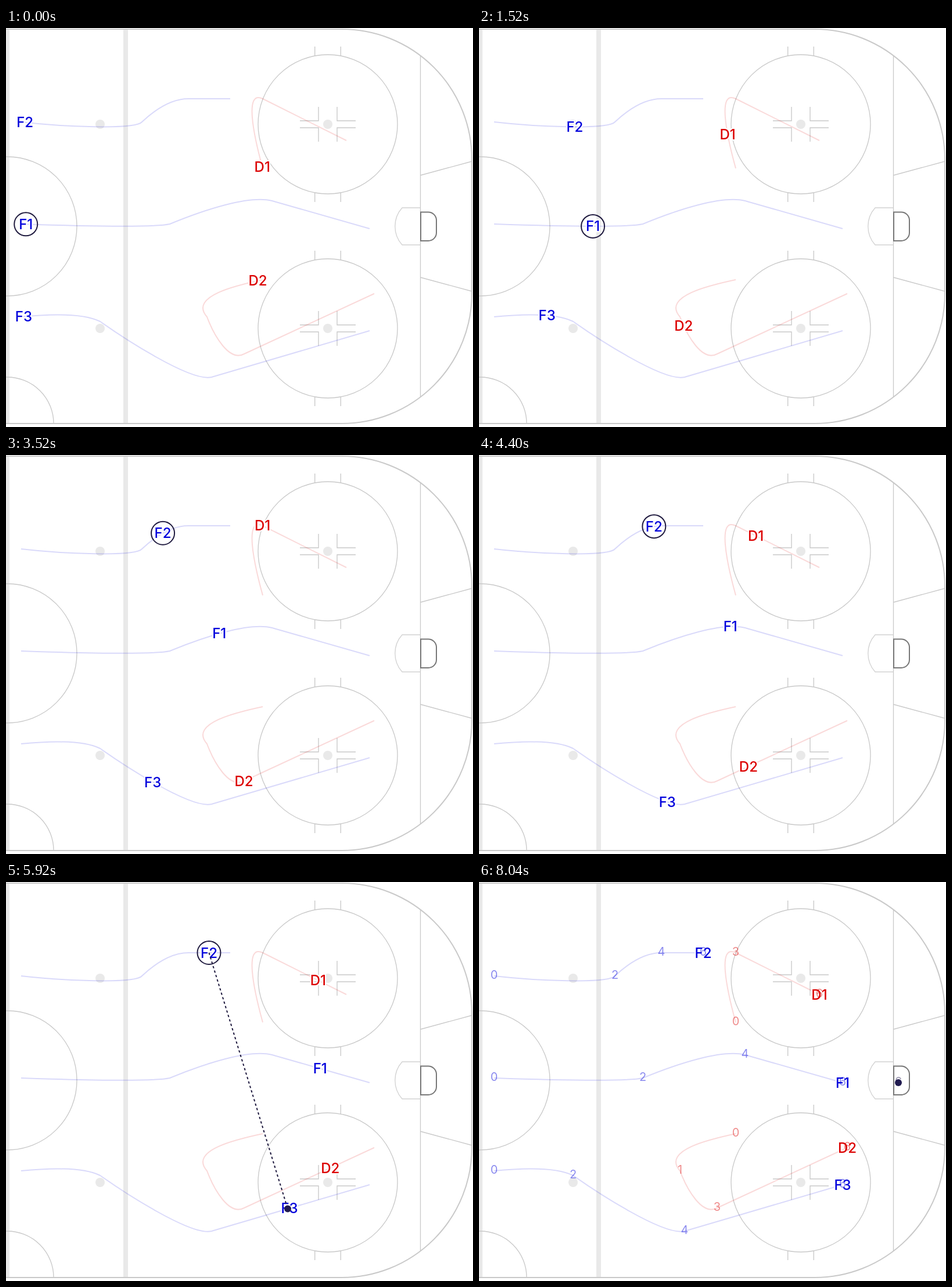
An HTML page that plays this animation: 804 px wide and 688 px high, repeating every 8080 ms.

```html
<!DOCTYPE html>
<html lang="en">
<head>
<meta charset="utf-8">
<title>Rush drill</title>
<style>
  html, body { margin: 0; width: 100%; height: 100%; overflow: hidden; background: #fff; }
  svg { display: block; width: 804px; height: 688px; font-family: Inter, Roboto, "Liberation Sans", sans-serif; }
  .line { fill: none; stroke: #c9c9c9; stroke-width: 1.35; }
  .fill { fill: #e9e9e9; }
  .route { fill: none; stroke-width: 2; opacity: .15; }
  .label { font-size: 24px; font-weight: 500; text-anchor: middle; stroke: #fff; stroke-width: 4; paint-order: stroke; }
  .count { font-size: 20px; text-anchor: middle; }
</style>
</head>
<body>
<svg id="stage" viewBox="0 0 804 688">
  <rect class="fill" x="-2" y="2" width="8" height="680"/>
  <rect class="fill" x="202" y="2" width="8" height="680"/>
  <circle class="fill" cx="162" cy="166" r="8"/>
  <circle class="fill" cx="162" cy="518" r="8"/>
  <g class="line">
    <circle cx="2" cy="342" r="120"/>
    <circle cx="2" cy="682" r="80"/>
    <path d="M713.5 47.5V636.5M713.5 254L802 230M713.5 430L802 454"/>
    <path d="M713.5 310H682A48 48 0 0 0 682 374H713.5" stroke="#d2d2d2"/>
  </g>
  <g id="spots"></g>
  <path class="line" style="stroke-width:2" d="M-4 2H578A224 224 0 0 1 802 226V458A224 224 0 0 1 578 682H-4"/>
  <rect x="-2" y="683" width="700" height="5" fill="#fff"/>
  <path d="M714 317.5H727A14 14 0 0 1 741 331.5V353A14 14 0 0 1 727 367H714Z" fill="none" stroke="#777" stroke-width="2"/>
  <g id="routes"></g>
  <g id="labels"></g>
  <circle id="ring" r="20" fill="none" stroke="#1f1a3f" stroke-width="2"/>
  <line id="pass" stroke="#1f1a3f" stroke-width="2" stroke-dasharray="4 4"/>
  <circle id="puck" r="6" fill="#211b50"/>
  <g id="counts"></g>
</svg>
<script>
const LOOP = 8080, UNIT = 1200;
const BLUE = '#0000dc', RED = '#dc0000', NAVY = '#211b50';
const GOAL = [722, 346];

// Each leg: the count it ends on, end point, optional two curve handles.
const players = {
  F1: { color: BLUE, start: [26, 338], legs: [
    [2, 282, 338, '112 341 250 345'], [4, 458, 298, '340 314 418 288'], [6, 626, 346]] },
  F2: { color: BLUE, start: [26, 162], legs: [
    [2, 234, 162, '95 170 222 176'], [4, 314, 122, '250 147 280 122'], [6, 386, 122]] },
  F3: { color: BLUE, start: [26, 498], legs: [
    [2, 162, 506, '66 494 130 490'], [4, 354, 602, '200 533 318 611'], [6, 626, 522]] },
  D1: { color: RED, start: [442, 242], legs: [
    [3, 442, 122, '426 184 410 106'], [6, 586, 194]] },
  D2: { color: RED, start: [442, 434], legs: [
    [1, 346, 498, '400 443 314 462'], [3, 410, 562, '358 530 384 576'], [6, 634, 458]] }
};

// Puck leaves at `from`, lands at `land`, changes hands at `end`.
const passes = [
  { by: 'F1', to: 'F2', from: 2400, land: 2670, end: 2700 },
  { by: 'F2', to: 'F3', from: 5700, land: 5956, end: 6000 },
  { by: 'F3', to: null, from: 7200, land: 7490, end: 7490 }
];

const $ = id => document.getElementById(id);

function make(tag, attrs, parent, text) {
  const el = document.createElementNS('http://www.w3.org/2000/svg', tag);
  set(el, attrs);
  if (text !== undefined) el.textContent = text;
  if (parent) parent.appendChild(el);
  return el;
}

function set(el, attrs) {
  for (const key in attrs) el.setAttribute(key, attrs[key]);
}

function addCount(n, x, y, color) {
  make('text', { class: 'count', x, y: y + 5, fill: color }, $('counts'), n);
}

for (const cy of [166, 518]) {
  const g = make('g', { transform: `translate(554 ${cy})` }, $('spots'));
  make('circle', { class: 'line', r: 120 }, g);
  make('circle', { class: 'fill', r: 8 }, g);
  for (const sx of [-1, 1]) for (const sy of [-1, 1]) {
    make('path', { class: 'line', d:
      `M${48 * sx} ${6 * sy}H${16 * sx}V${30 * sy}M${22.3 * sx} ${118 * sy}V${134 * sy}` }, g);
  }
}

for (const name in players) {
  const p = players[name];
  let [x, y] = p.start, last = 0, route = `M${x} ${y}`;
  addCount(0, x, y, p.color);
  p.parts = p.legs.map(([count, ex, ey, bend]) => {
    const step = bend ? `C${bend} ${ex} ${ey}` : `L${ex} ${ey}`;
    const path = make('path', { d: `M${x} ${y}${step}` });
    const part = { path, length: path.getTotalLength(), from: last * UNIT, to: count * UNIT };
    route += step;
    addCount(count, ex, ey, p.color);
    [x, y, last] = [ex, ey, count];
    return part;
  });
  make('path', { class: 'route', d: route, stroke: p.color }, $('routes'));
  p.label = make('text', { class: 'label', fill: p.color }, $('labels'), name);
}
addCount(6, ...GOAL, NAVY);

function place(name, clock) {
  const { parts } = players[name];
  const part = parts.find(q => clock < q.to) || parts[parts.length - 1];
  const k = Math.min(1, (clock - part.from) / (part.to - part.from));
  const pt = part.path.getPointAtLength(k * part.length);
  return [pt.x, pt.y];
}

function draw(t) {
  const clock = 76 + t * 0.9975;
  for (const name in players) {
    const [x, y] = place(name, clock);
    set(players[name].label, { x, y: y + 8.6 });
  }

  const play = passes.find(q => clock < q.end);
  const flying = play && clock >= play.from;
  $('ring').style.display = play ? '' : 'none';
  $('pass').style.display = flying ? '' : 'none';
  $('puck').style.display = flying || !play ? '' : 'none';

  let spot = GOAL;
  if (play) {
    const [x, y] = place(play.by, clock);
    set($('ring'), { cx: x, cy: y });
    if (flying) {
      const k = Math.min(1, (clock - play.from) / (play.land - play.from));
      const aim = play.to ? place(play.to, play.land) : GOAL;
      spot = [x + (aim[0] - x) * k, y + (aim[1] - y) * k];
      set($('pass'), { x1: x, y1: y, x2: spot[0], y2: spot[1] });
    }
  }
  set($('puck'), { cx: spot[0], cy: spot[1] });

  const fade = Math.max(0, Math.min(1, (t - 7690) / 350));
  $('counts').style.opacity = 0.45 * fade;
}

const began = performance.now();
function tick() {
  draw((performance.now() - began) % LOOP);
  requestAnimationFrame(tick);
}
tick();
</script>
</body>
</html>
```
